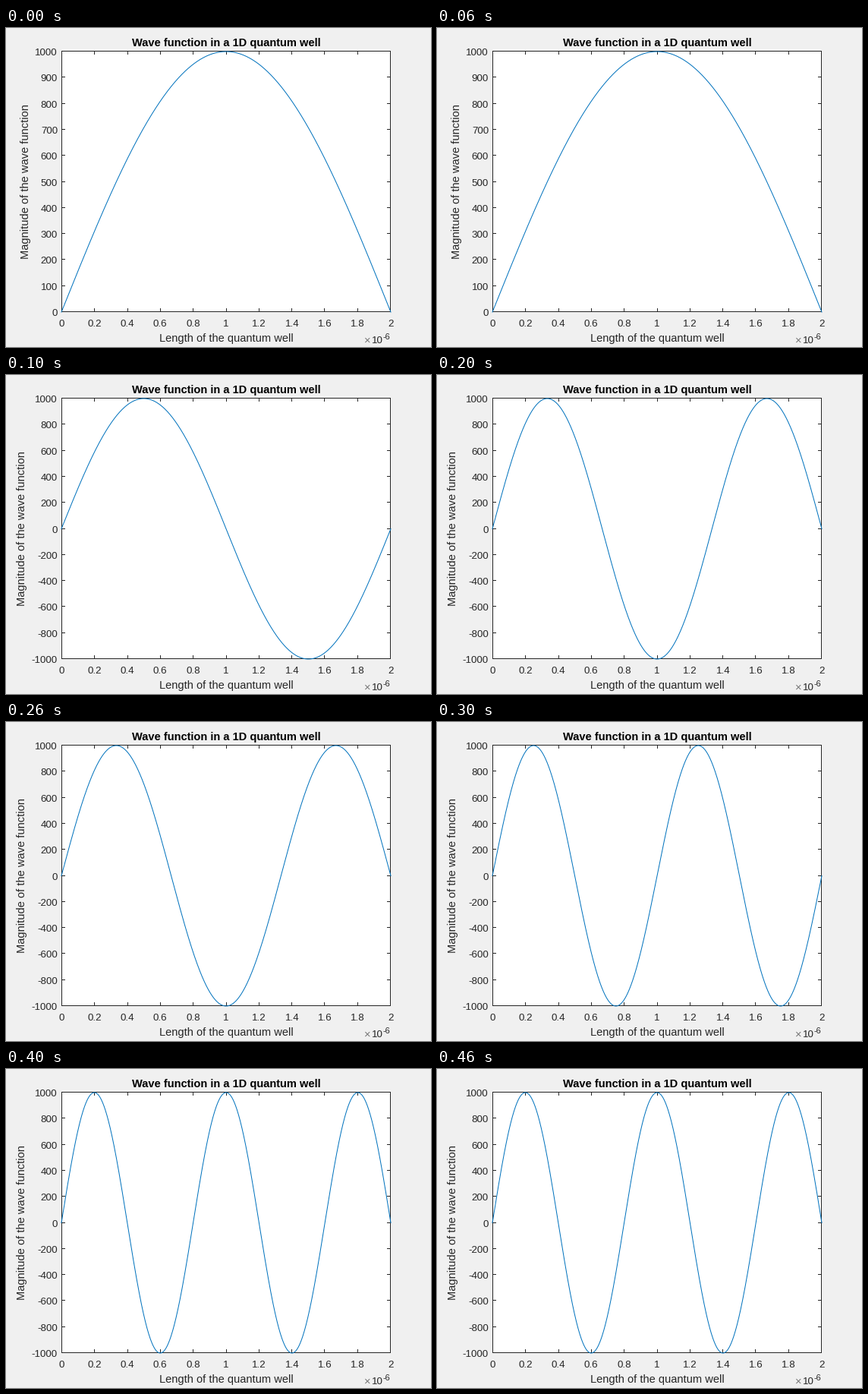
A matplotlib script for the animation above (0.5 s loop, 560 px wide and 420 px high).

```python
import matplotlib.pyplot as plt
import numpy as np
from matplotlib.animation import FuncAnimation

plt.rcParams["font.family"] = ["Liberation Sans"]

W, H, DPI = 560, 420, 100
LEFT, RIGHT, TOP, BOTTOM = 73, 507, 31, 374       # data range in pixels
X0, X1, Y0, Y1 = 73.5, 506.5, 30.5, 373.5         # centres of the box lines
PX = 72 / DPI                                     # points per pixel
INK, BLUE = "#262626", "#0072bd"
TICK, LABEL = 13.33, 14.67                        # text sizes in pixels
TICK_LEN = 4.5
STATES = 5

fig = plt.figure(figsize=(W / DPI, H / DPI), dpi=DPI, facecolor="#f0f0f0")
ax = fig.add_axes([0, 0, 1, 1])
ax.set(xlim=(0, W), ylim=(H, 0))
ax.axis("off")


def text(x, y, s, size=TICK, color=INK, ha="center", **kw):
    return ax.text(x, y, s, fontsize=size * PX, color=color, ha=ha,
                   va="baseline", rotation_mode="anchor", **kw)


def segment(x0, y0, x1, y1):
    return ax.plot([x0, x1], [y0, y1], color=INK, lw=PX, snap=False,
                   solid_capstyle="butt", zorder=2)[0]


def x_pixel(u):
    return LEFT + (RIGHT - LEFT) * u


def y_pixel(v):
    return BOTTOM - (BOTTOM - TOP) * v


def line_at(start, end, t):
    """Pixel centre nearest to the point t of the way along a box side."""
    return np.floor(start + (end - start) * t) + 0.5


def y_ticks(low, step):
    """Tick marks and labels from low to 1000, as a list of artists."""
    parts = []
    for value in range(low, 1001, step):
        t = (value - low) / (1000 - low)
        row = line_at(Y1, Y0, t)
        if 0 < t < 1:
            parts.append(segment(X0, row, X0 + TICK_LEN, row))
            parts.append(segment(X1 - TICK_LEN, row, X1, row))
        baseline = int(y_pixel(t) + 0.5) + 5
        parts.append(text(68, baseline, str(value), ha="right"))
    return parts


# Plot box
ax.fill([X0, X1, X1, X0], [Y0, Y0, Y1, Y1], color="white", lw=0, zorder=1)
for y in (Y0, Y1):
    segment(X0 - 0.5, y, X1 + 0.5, y)
for x in (X0, X1):
    segment(x, Y0 - 0.5, x, Y1 + 0.5)

# Horizontal axis
for i in range(11):
    t = i / 10
    col = line_at(X0, X1, t)
    if 0 < t < 1:
        segment(col, Y0, col, Y0 + TICK_LEN)
        segment(col, Y1 - TICK_LEN, col, Y1)
    text(x_pixel(t), 393, f"{2 * t:g}")

text(476.5, 416, "×", LABEL, "#777777")
text(481.5, 415, "10", ha="left")
text(497, 410, "-6", 11, ha="left")

# Titles
text(290, 24, "Wave function in a 1D quantum well", LABEL, "black",
     weight="bold")
text(290.5, 413, "Length of the quantum well", LABEL)
y_label = text(25, 202.5, "Magnitude of the wave function", LABEL,
               rotation=90)

scales = [y_ticks(0, 100), y_ticks(-1000, 200)]
u = np.linspace(0, 1, 1001)
curve, = ax.plot([], [], color=BLUE, lw=PX, clip_on=False, zorder=3)


def draw(frame):
    n = frame + 1
    signed = n > 1
    wave = np.sin(n * np.pi * u)
    curve.set_data(x_pixel(u), y_pixel((wave + 1) / 2 if signed else wave))
    for k, parts in enumerate(scales):
        for part in parts:
            part.set_visible(k == signed)
    y_label.set_x(25 if signed else 30)
    return [curve]


anim = FuncAnimation(fig, draw, frames=STATES, init_func=lambda: draw(0),
                     interval=100, repeat=True, repeat_delay=0)
plt.show()
```
